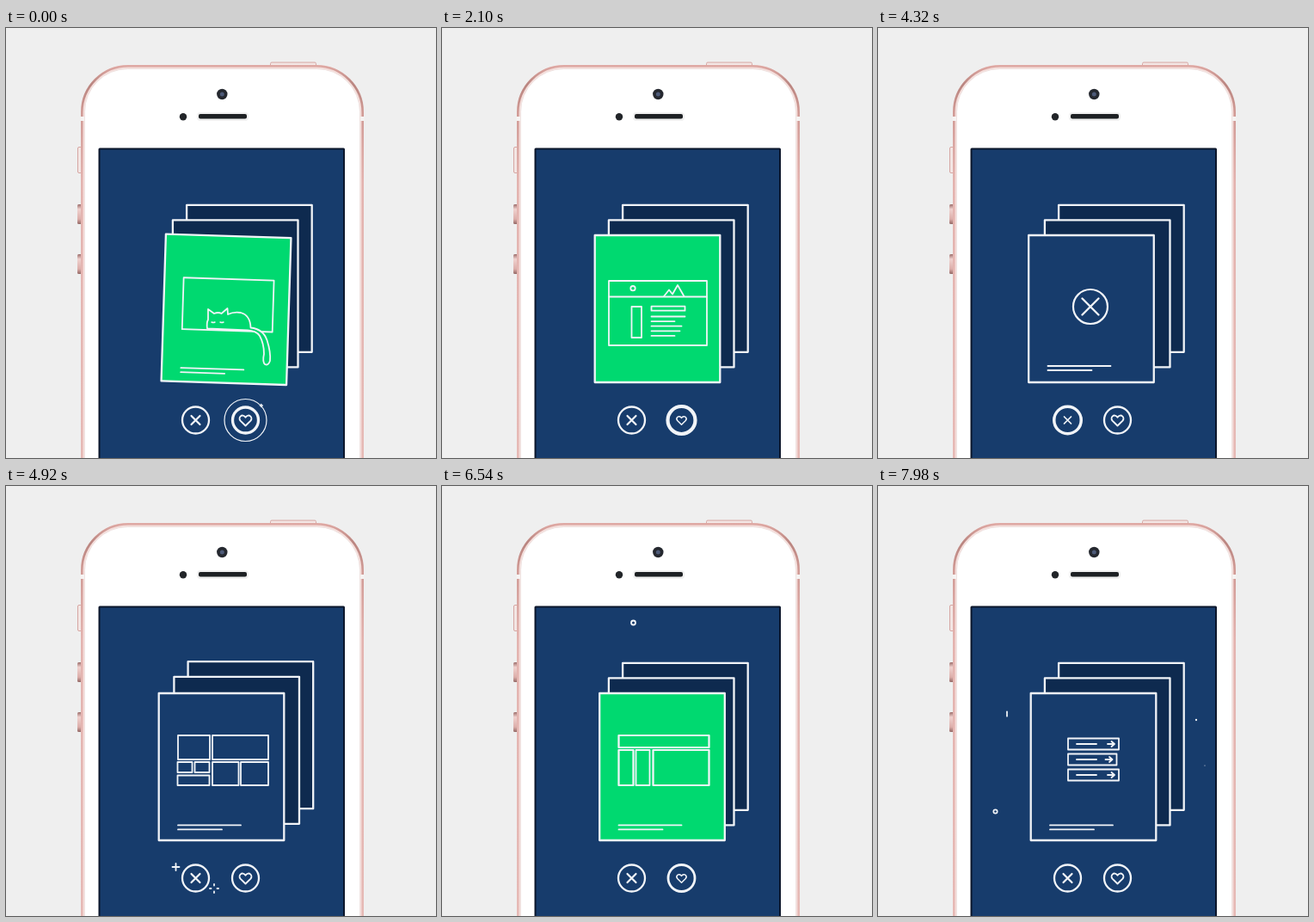
These frames come from a looping animation (500 px wide and 500 px high, 8 s). An HTML page:

```html
<!DOCTYPE html>
<html lang="en">
<head>
<meta charset="utf-8">
<title>Card swipe</title>
<style>
  html, body { margin: 0; width: 100%; height: 100%; overflow: hidden; background: #efefef; }
  svg { display: block; width: 100%; height: 100%; }
</style>
</head>
<body>
<svg viewBox="0 0 500 500">
  <defs>
    <linearGradient id="rim" gradientUnits="userSpaceOnUse" x1="0" x2="0" y1="43" y2="500">
      <stop offset="0" stop-color="#e0aaa5"/>
      <stop offset=".05" stop-color="#b98580"/>
      <stop offset=".12" stop-color="#d09a95"/>
      <stop offset=".3" stop-color="#e3b3af"/>
      <stop offset="1" stop-color="#e6b9b5"/>
    </linearGradient>
    <linearGradient id="key" x1="0" x2="0" y1="0" y2="1">
      <stop offset="0" stop-color="#9d6f6c"/>
      <stop offset=".25" stop-color="#f0d2cf"/>
      <stop offset=".75" stop-color="#dcaeaa"/>
      <stop offset="1" stop-color="#946966"/>
    </linearGradient>
    <clipPath id="screen"><rect x="109" y="141" width="284" height="360"/></clipPath>
  </defs>
  <rect width="500" height="500" fill="#efefef"/>
  <g fill="#f3e6e4" stroke="#d6a6a2">
    <rect x="83.500" y="138.500" width="6" height="30" rx="1.500"/>
    <rect x="307.500" y="40" width="53" height="6" rx="1.500"/>
  </g>
  <g fill="url(#key)">
    <rect x="83" y="205" width="6" height="23" rx="1.500"/>
    <rect x="83" y="263" width="6" height="23" rx="1.500"/>
  </g>
  <rect x="87" y="43" width="329" height="520" rx="55" fill="#f5dedb"/>
  <rect x="88.300" y="44.300" width="326.400" height="518" rx="53.700" fill="none" stroke="url(#rim)" stroke-width="2.600"/>
  <path d="M86.500 105.500h6M410.500 105.500h6" stroke="#f6f3f2" stroke-width="5"/>
  <rect x="91.500" y="47.500" width="320" height="520" rx="50" fill="#fff" stroke="#efe3e1"/>
  <circle cx="251.300" cy="77" r="6.200" fill="#25282f"/>
  <circle cx="251.300" cy="77" r="2.500" fill="#4d5a78"/>
  <circle cx="206" cy="103.300" r="4.200" fill="#222529"/>
  <rect x="222" y="98" width="60" height="10" rx="4" fill="#f0f0f0"/>
  <rect x="224" y="100" width="56" height="5.600" rx="2" fill="#1d2023"/>
  <rect x="107.500" y="139.500" width="286.500" height="370" rx="1.500" fill="#0b162b"/>
  <rect x="109.500" y="141.500" width="282.500" height="370" fill="#173c6c"/>
  <g id="scene" clip-path="url(#screen)" fill="none" stroke="#f1f4f8" stroke-width="1.800"
     stroke-linecap="round" stroke-linejoin="round"></g>
</svg>
<script>
const LOOP = 8000, CX = 250.5, CY = 326.5;
const SHIFT = 5.5, DROP = .8, TILT = 1.8;
const BLUE = [23, 60, 108], DARK = [14, 42, 79], GREEN = [0, 217, 112];
const scene = document.getElementById('scene');

const ramp = (t, a, b) => Math.min(1, Math.max(0, (t - a) / (b - a)));
const easeOut = u => 1 - (1 - u) ** 3;
const easeBoth = u => u * u * (3 - 2 * u);
const mix = (a, b, u) => a + (b - a) * u;
const color = (a, b, u) => `rgb(${a.map((v, i) => Math.round(mix(v, b[i], u)))})`;
const path = (d, extra = '') => `<path d="${d}" ${extra}/>`;
const rect = (x, y, w, h, extra = '') => `<rect x="${x}" y="${y}" width="${w}" height="${h}" ${extra}/>`;
const circle = (x, y, r, extra = '') => `<circle cx="${x}" cy="${y}" r="${r}" ${extra}/>`;
const group = (body, transform, opacity = 1) => `<g transform="${transform}" opacity="${opacity}">${body}</g>`;

// Piecewise linear track: keys are [time, value]
function track(t, ...keys) {
  if (t <= keys[0][0]) return keys[0][1];
  for (let i = 1; i < keys.length; i++) {
    const [a, v] = keys[i - 1], [b, w] = keys[i];
    if (t < b) return mix(v, w, (t - a) / (b - a));
  }
  return keys[keys.length - 1][1];
}

const caption = y => path(`M200 ${y}H273M200 ${y + 5}H251`);

function cat() {
  const body = path('M234 349.500Q233 343 235 339L235 327L242 332Q247 330 250.500 332L257.500 326L258 333' +
    'Q265 329.500 273 331Q284 334 284.500 348.500Q299 350 303.500 363Q308 377 307 387Q305 393 301 391' +
    'Q298 388 300 379Q300 367 295 358Q291 352 281 351.500Z', 'fill="#00d970"') +
    path('M239 342q2 1 4 0M249 342q2 1 4 0', 'stroke-width="1.4"');
  return rect(200, 291, 105, 60) +
    group(body, `rotate(${-TILT} ${CX} ${CY}) translate(${-SHIFT} ${-DROP})`) + caption(396);
}

function page(t) {
  const m = easeBoth(ramp(t, 1600, 1900));
  const x = mix(219.5, 194, m), w = mix(61.5, 114, m), tx = mix(231, 243.5, m);
  const ends = [39, 27, 35, 33, 27];
  return rect(x, 294, w, mix(80.5, 75, m)) + path(`M${x} 312.500h${w}`) +
    circle(mix(233, 222, m), 302.7, 2.7) +
    path(`M${mix(249, 258, m)} 312l6-7.500l4 5l6-10.500l7.500 13`) +
    rect(tx, 323.7, 39, 5) +
    path(ends.map((e, i) => `M${tx} ${335.5 + 5.6 * i}h${e}`).join('')) +
    rect(mix(231, 220.5, m), 324, 11.5 * m, 36, `opacity="${m}"`);
}

const cross = () => circle(249.5, 324, 20, 'stroke-width="2.2"') +
  path('M240 314.500l19 19m0-19l-19 19', 'stroke-width="2.4"') + caption(393);

function grid(t) {
  const m = easeBoth(ramp(t, 5550, 5950));
  const top = [200, 290, 105, 14], left = [200, 307, 17, 41], mid = [220, 307, 16, 41], right = [240, 307, 65, 41];
  const cells = [
    [[200, 290, 37, 28], top], [[240, 290, 65, 28], top],
    [[199.5, 321, 17, 12], left], [[219.5, 321, 17, 12], mid], [[199.5, 336.5, 37, 11.5], left],
    [[240, 321, 30.5, 27], right], [[273, 321, 32, 27], right]
  ];
  return cells.map(([a, b]) => rect(...a.map((v, i) => mix(v, b[i], m)))).join('') + caption(394.4);
}

function list(t) {
  return [0, 1, 2].map(i => {
    const y = 293.5 + 18 * i, start = 7300 + 180 * i;
    const w = i === 1 ? mix(59, 56.5, ramp(t, start + 350, start + 480)) : 59;
    return rect(221, y, w, 13) + path(`M231 ${y + 6.5}h23M${208 + w} ${y + 6.5}h8m-3.500-3l3.500 3l-3.500 3`);
  }).join('') + caption(394.4);
}

const contents = [cat, page, cross, grid, list];
const swipes = [
  { at: -140, dir: 1 }, { at: 2100, dir: 1 }, { at: 4280, dir: -1 }, { at: 6460, dir: 1 }
];

// kind, x, y, start, time at that place, end
const ring = [['o', 384, 260.5, 0, 620, 900], ['v', 371, 377, 0, 620, 900], ['.', 141, 313, 0, 620, 980],
  ['o', 222, 500, 0, 620, 900], ['o', 222.5, 159, 400, 990, 1300]];
const sparks = [
  ...[700, 5550].flatMap(d => ring.map(([k, x, y, ...ts]) => [k, x, y, ...ts.map(v => v + d)])),
  ['o', 278, 173.5, 2900, 3300, 4000], ['.', 129, 303.5, 2900, 3300, 4000], ['h', 346.5, 308, 2900, 3300, 3900],
  ['v', 150, 265, 7450, 7980, 8300], ['o', 136.5, 378.5, 7450, 7980, 8300],
  ['.', 370, 272, 7450, 7980, 8300], ['.', 380, 325, 7450, 7980, 8050]
];

function spark([kind, x, y, start, seen, end], t) {
  if (t < start || t > end) return '';
  const reach = v => easeOut(ramp(v, start, start + 850));
  const k = reach(t) / reach(seen), s = ramp(t, start, start + 600) * (1 - ramp(t, end - 150, end));
  const shape = {
    o: circle(0, 0, 2.5, 'stroke-width="1.9"'),
    '.': circle(0, 0, 1.3, 'fill="#f1f4f8" stroke="none"'),
    v: path('M0-3V3', 'stroke-width="2"'),
    h: path('M-5 0H5', 'stroke-width="2.600"')
  }[kind];
  return group(shape, `translate(${mix(CX, x, k)} ${mix(CY, y, k)}) scale(${s})`);
}

function card(slot, fill, inner = '', transform = '', opacity = 1) {
  const x = 16.2 * slot, y = -17.6 * slot;
  return group(rect(177.7, 241, 145.6, 171, `fill="${fill}" stroke-width="2.3"`) + inner,
    `translate(${x} ${y}) ${transform}`, opacity);
}

function fly(ph, dir) {
  const u = ramp(ph, 140, 400) ** 3, lean = ramp(ph, 85, 140);
  const x = dir * (SHIFT * ramp(ph, 10, 75) + 255 * u);
  return `translate(${x} ${DROP * lean}) rotate(${dir * (TILT * lean + 11 * u)} ${CX} ${CY})`;
}

function button(x, icon, ph) {
  const r = track(ph, [-200, 15.5], [0, 16], [80, 15.5], [140, 15], [320, 15.5]);
  const sw = track(ph, [-200, 2.3], [0, 4.2], [80, 2.8], [140, 3.3], [320, 2.3]);
  const size = track(ph, [-200, 1], [0, .8], [80, .8], [140, 1]);
  let out = circle(0, 0, r, `stroke-width="${sw}"`) + group(icon, `scale(${size})`);
  if (ph > 95 && ph < 420) {
    const a = (-43 + (ph - 140) * .6) * Math.PI / 180, fade = 1 - ramp(ph, 280, 420);
    out += group(circle(0, 0, 24.5, 'stroke-width="1.2"') +
      path(`M${25 * Math.cos(a)} ${25 * Math.sin(a)}m-1.500 0h3m-1.500-1.500v3`, 'stroke-width="1.5"'), '', fade);
  }
  if (ph > 360 && ph < 860) {
    const s = easeOut(ramp(ph, 360, 520)) * (1 - ramp(ph, 720, 860));
    out += group(path('M-4 0H4M0-4V4'), `translate(-23 -13) scale(${s})`) +
      group(path('M-5 0h1.500M3.500 0H5M0-5v1.500M0 3.500V5', 'stroke-width="1.8"'), `translate(21.500 12) scale(${s})`);
  }
  return group(out, `translate(${x} 456)`);
}

const crossIcon = path('M-5-5L5 5M5-5L-5 5', 'stroke-width="2.2"');
const heartIcon = path('M0 6.500L-6 .6C-9-3-4-8.500 0-3.300C4-8.500 9-3 6 .6Z', 'stroke-width="1.9"');

function draw(t) {
  let i = 0;
  while (i < 3 && t >= swipes[i + 1].at - 200) i++;
  const { at, dir } = swipes[i], ph = t - at;
  const lag = ph < 300 ? 1 : 1 - easeOut(ramp(ph, 300, 920));
  const lead = 1 - easeOut(ramp(ph, 300, 600));
  const dark = color(DARK, DARK, 0);
  let out = ph < 300 ? '' : card(2 + lag, dark, '', '', ramp(ph, 300, 420));
  out += card(1 + lag, dark);
  const burst = sparks.map(s => spark(s, t)).join('');
  const inner = group(contents[i + 1](t), '', ramp(ph, 400, 580));
  const next = card(lead, color(BLUE, DARK, lead), inner);
  if (ph < 410) {
    const tint = dir > 0 ? ramp(ph, -150, -50) : 0;
    out += next + burst + card(0, color(BLUE, GREEN, tint), contents[i](t), fly(ph, dir));
  } else {
    out += burst + next;
  }
  out += button(220.5, crossIcon, dir < 0 ? ph : -999) + button(278.5, heartIcon, dir > 0 ? ph : -999);
  scene.innerHTML = out;
}

let begin;
function tick(now) {
  begin ??= now;
  draw((now - begin) % LOOP);
  requestAnimationFrame(tick);
}
draw(0);
requestAnimationFrame(tick);
</script>
</body>
</html>
```
